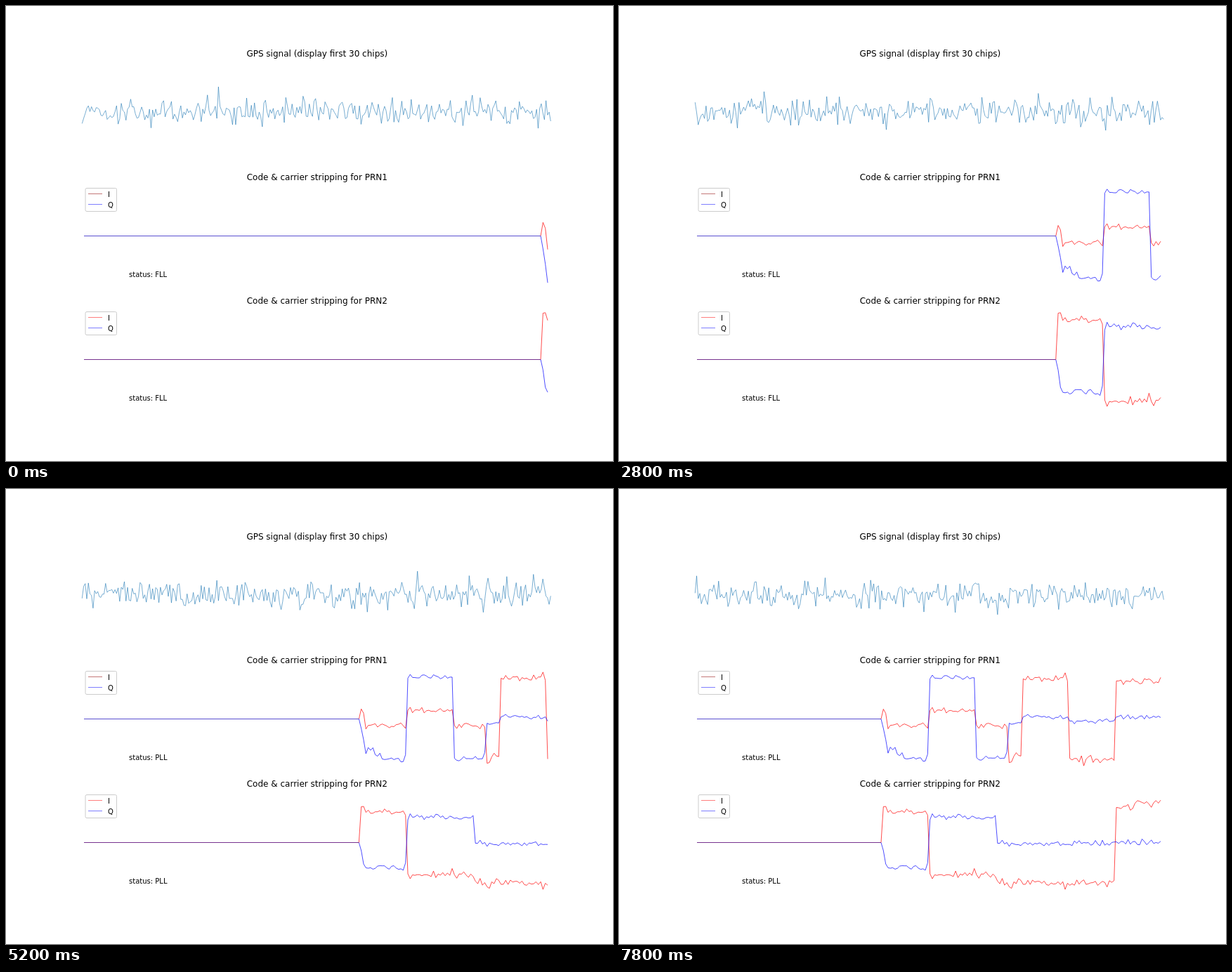
Recreate the animation shown at these times as an HTML page with a canvas. Size 864 by 648 pixels, loop 8 s.

```html
<!DOCTYPE html>
<html lang="en">
<head>
<meta charset="utf-8">
<title>GPS signal tracking</title>
<style>
html, body { margin: 0; width: 100%; height: 100%; overflow: hidden; background: #fff; }
canvas { display: block; }
</style>
</head>
<body>
<canvas id="stage" width="864" height="648"></canvas>
<script>
const ctx = document.getElementById('stage').getContext('2d');
const FONT = '"DejaVu Sans", sans-serif';
const LOOP = 8000, STEP = 200, PER_STEP = 3, TOTAL = 120;
const LEFT = 111, RIGHT = 771, DX = (RIGHT - LEFT) / 199;
const HALF = 66.7;
const RED = '#f00', BLUE = '#00f';

function random(seed) {
  let s = seed >>> 0;
  return () => {
    s = (s + 0x6D2B79F5) >>> 0;
    let t = Math.imul(s ^ (s >>> 15), s | 1);
    t ^= t + Math.imul(t ^ (t >>> 7), t | 61);
    return ((t ^ (t >>> 14)) >>> 0) / 4294967296;
  };
}

// Levels as (start, value) pairs; samples after each start get jitter.
function series(levels, seed, jitter) {
  const rnd = random(seed), out = [0];
  for (let i = 0; i < levels.length; i += 2) {
    const start = levels[i], end = levels[i + 2] || TOTAL + 1;
    out[start] = levels[i + 1];
    for (let k = start + 1; k < end; k++) {
      out[k] = levels[i + 1] + (rnd() + rnd() - 1) * jitter;
    }
  }
  return out;
}

const i1 = series([1, 14, 2, 8, 3, -14, 4, -9, 21, 12, 41, -9, 55, -62, 57, -53, 61, 57,
  79, 65.5, 80, 54, 81, -56, 87, -66.5, 88, -57, 101, 54], 11, 6);
const q1 = series([1, -13.4, 2, -29, 3, -48.5, 4, -40, 7, -50, 10, -56, 18, -60, 20, -50,
  21, 57, 22, 62.3, 23, 58, 41, -55, 54, -47, 55, -6, 61, 3, 81, -3, 101, 3], 23, 4.5);
const i2 = series([1, 51, 2, 51.5, 3, 43, 20, 39, 21, -44.5, 22, -51.5, 23, -46, 40, -37,
  41, -46, 50, -55, 55, -63, 57, -56, 79, -66.7, 80, -58, 101, 50, 109, 56], 37, 6);
const q2 = series([1, -11.5, 2, -30.5, 3, -36, 20, -29, 21, 32.5, 22, 41, 23, 36,
  50, -1, 101, 1], 53, 5);

function text(str, x, y, size, align = 'left') {
  ctx.font = `${size}px ${FONT}`;
  ctx.textAlign = align;
  ctx.fillStyle = '#000';
  ctx.fillText(str, x, y);
}

function line(points, color, width) {
  ctx.beginPath();
  points.forEach(([x, y]) => ctx.lineTo(x, y));
  ctx.strokeStyle = color;
  ctx.lineWidth = width;
  ctx.stroke();
}

function drawSignal(step) {
  const rnd = random(9001 + step * 577);
  const points = Array.from({ length: 300 }, (_, n) => {
    const gauss = Math.sqrt(-2 * Math.log(1 - rnd())) * Math.cos(2 * Math.PI * rnd());
    return [108.3 + n * 667 / 299, 150.5 - 9.5 * gauss];
  });
  text('GPS signal (display first 30 chips)', 442.8, 72, 12, 'center');
  line(points, '#1f77b4', 0.6);
}

function drawLegend(top, key) {
  const y = 259.5 + top;
  ctx.beginPath();
  ctx.roundRect(113, y, 44.5, 33, 2);
  ctx.strokeStyle = '#ccc';
  ctx.lineWidth = 1;
  ctx.stroke();
  line([[117, y + 8], [137, y + 8]], key, 1);
  line([[117, y + 23], [137, y + 23]], '#7f7fff', 1);
  text('I', 145, y + 12, 10);
  text('Q', 145, y + 27, 10);
}

function drawChannel(name, top, i, q, status, flat, key, step) {
  const zero = 327.5 + top;
  const count = Math.min(TOTAL, PER_STEP * (step + 1));
  const seen = values => values.slice(0, count + 1);
  const scale = HALF / Math.max(...[...seen(i), ...seen(q)].map(Math.abs));
  const knee = RIGHT - count * DX;
  const curve = values => seen(values).map((v, k) => [knee + k * DX, zero - v * scale]);

  text('Code & carrier stripping for ' + name, 442.8, 248 + top, 12, 'center');
  line([[LEFT, zero], [knee, zero]], flat, 1);
  line(curve(i), RED, 0.7);
  line(curve(q), BLUE, 0.7);
  drawLegend(top, key);
  text('status: ' + status, 175, 386.3 + top, 10);
}

let shown = -1;
function tick() {
  const step = Math.floor(performance.now() % LOOP / STEP);
  if (step !== shown) {
    shown = step;
    ctx.fillStyle = '#fff';
    ctx.fillRect(0, 0, 864, 648);
    ctx.lineJoin = 'round';
    drawSignal(step);
    drawChannel('PRN1', 0, i1, q1, step < 18 ? 'FLL' : 'PLL', '#5a4fd0', '#c47878', step);
    drawChannel('PRN2', 176, i2, q2, step < 16 ? 'FLL' : 'PLL', '#76328f', '#ff7f7f', step);
  }
  requestAnimationFrame(tick);
}
tick();
</script>
</body>
</html>
```
